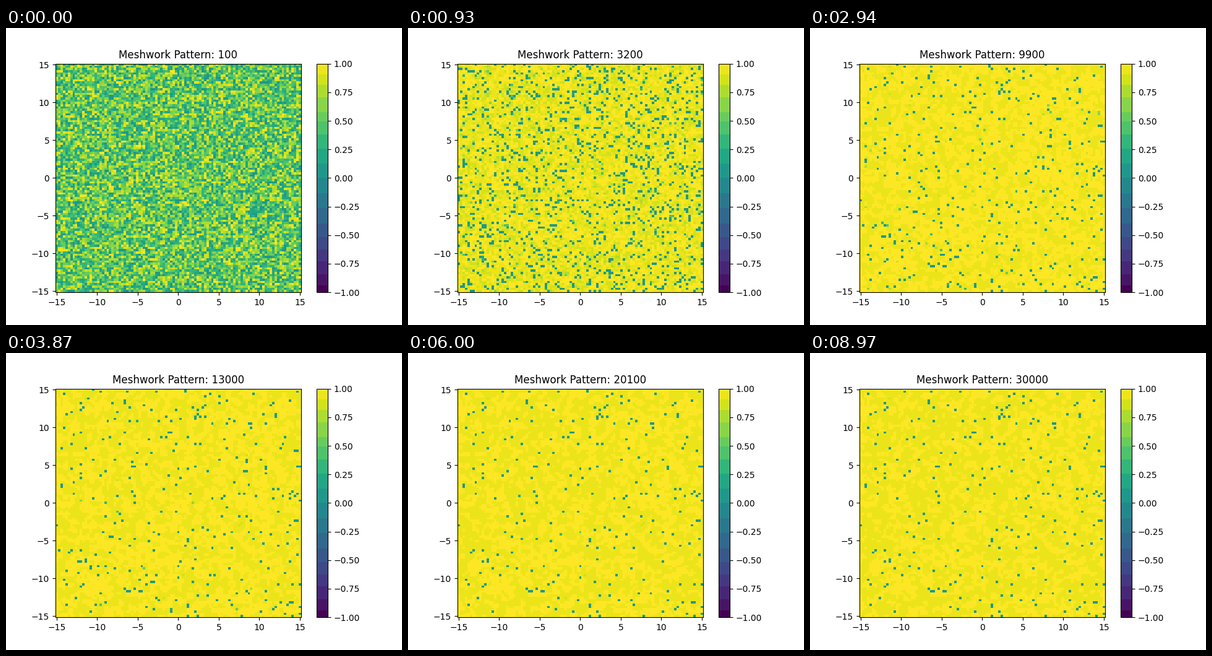
These frames come from a looping animation (640 px wide and 480 px high, 9 s). A matplotlib script:

```python
import numpy as np
import matplotlib.pyplot as plt
from matplotlib.animation import FuncAnimation
from matplotlib.colors import ListedColormap

FRAMES, INTERVAL = 300, 30
STEPS = 100
N, HALF = 101, 15.15


def banded_viridis():
    """Viridis reduced to flat bands; edges are measured down the bar."""
    top, height = 57.6, 369.6
    edges = np.array([57.6, 62, 75, 92, 113, 135, 151, 172, 195, 219, 242.5,
                      267, 291, 316, 337, 358, 377, 399, 415, 427.2])
    levels = (1 - (edges - top) / height)[::-1]
    centres = (levels[1:] + levels[:-1]) / 2
    centres[0], centres[-1] = 0, 1
    x = (np.arange(256) + 0.5) / 256
    band = np.digitize(x, levels[1:-1])
    return ListedColormap(plt.get_cmap("viridis")(centres[band]))


def smooth(a):
    for axis in (0, 1):
        a = np.roll(a, 1, axis) + 2.5 * a + np.roll(a, -1, axis)
    return (a - a.mean()) / a.std()


rng = np.random.default_rng(7)
rough = rng.normal(size=(N, N))
soft = smooth(rng.normal(size=(N, N)))
kind = rng.random((N, N))
start = rng.uniform(0.2, 1, (N, N))
escape = rng.exponential(30, (N, N))

frozen = kind < 0.024
slow = kind < 0.27
start[slow] = 0.4 * (start[slow] - 0.2)
escape[frozen] = 1e6


def field(n):
    # Level the active cells settle to: rough early, smooth patches later
    mix = np.pi / 2 * (1 - np.exp(-n / 50))
    spread = 0.02 + 0.13 * np.exp(-n / 25)
    noise = np.cos(mix) * rough + np.sin(mix) * soft
    goal = 0.971 + 0.03 * np.exp(-n / 80) + spread * noise

    fast = goal + (start - goal) * np.exp(-n / 15)
    rise = 1 / (1 + np.exp(-np.clip((n - escape) / 2.5 - 2, -50, 50)))
    late = rise * goal + (1 - rise) * start * np.exp(-n / 12)
    return np.clip(np.where(slow, late, fast), 0.01, 1)


fig, ax = plt.subplots(figsize=(6.4, 4.8), dpi=100)
mesh = ax.imshow(field(1), cmap=banded_viridis(), vmin=-1, vmax=1,
                 origin="lower", aspect="auto", interpolation="nearest",
                 extent=(-HALF, HALF, -HALF, HALF))
fig.colorbar(mesh, ax=ax)
title = ax.set_title("")


def update(i):
    mesh.set_data(field(i + 1))
    title.set_text(f"Meshwork Pattern: {STEPS * (i + 1)}")
    return mesh, title


anim = FuncAnimation(fig, update, frames=FRAMES, interval=INTERVAL,
                     repeat=True, repeat_delay=0)
plt.show()
```
